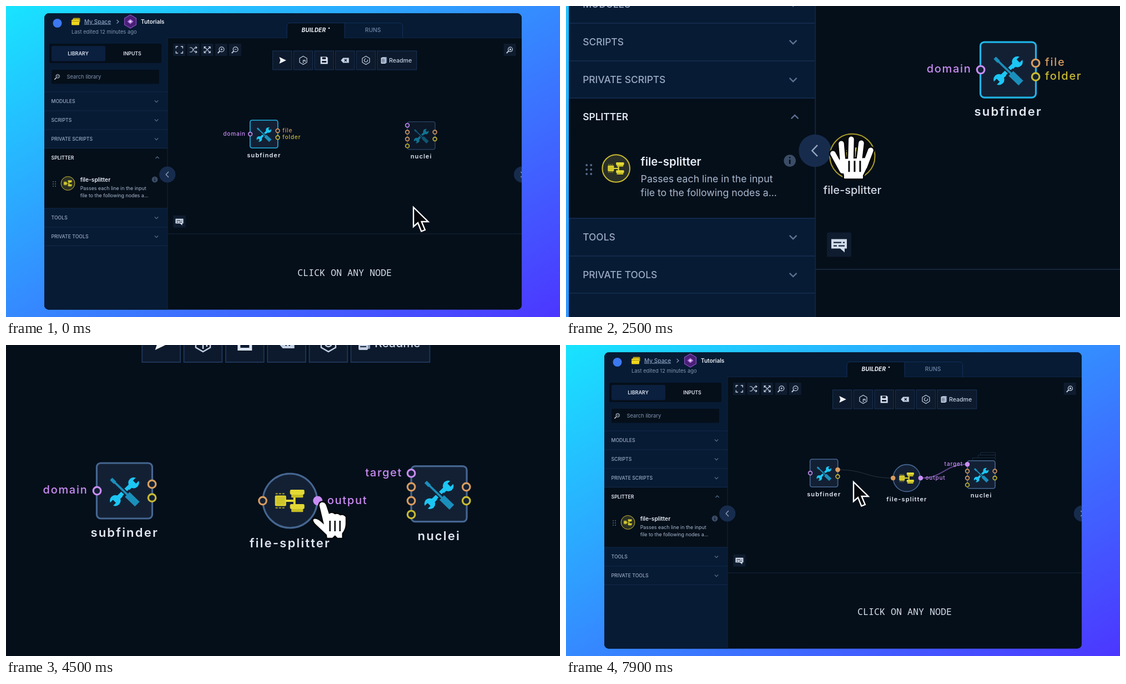
These frames come from a looping animation (998 by 561 pixels, 8 s). An HTML page:

```html
<!DOCTYPE html>
<html lang="en">
<head>
<meta charset="utf-8">
<title>Workflow builder</title>
<style>
html, body { margin: 0; width: 100%; height: 100%; overflow: hidden; background: #050f1a; }
svg { display: block; width: 100%; height: 100%; }
text { font-family: Inter, "Open Sans", sans-serif; white-space: pre; }
.mono { font-family: "Noto Sans Mono", "Liberation Mono", monospace; }
.node { font-weight: 600; letter-spacing: 1.1px; }
.port { font-weight: 500; letter-spacing: .85px; }
</style>
</head>
<body>
<svg id="stage" viewBox="0 0 998 561" xmlns="http://www.w3.org/2000/svg"></svg>
<script>
const LOOP = 8000, STEP = 100;
const C = {
  panel: '#050f1a', side: '#071b34', rule: '#12294a', text: '#d5deeb', muted: '#8496b3',
  cyan: '#1fb4e6', idle: '#456690', purple: '#c98df5', orange: '#d89c5f', yellow: '#c9bb30',
  bright: '#e3d935', body: '#132034', steel: '#1b8fbb', wrench: '#1cc6f4', icon: '#c4d0e2', ink: '#05070a'
};
// Moments of the story, in ms
const GRAB = 2200, DROP = 3250, PULL1 = 4400, JOIN1 = 5250, PULL2 = 6150, JOIN2 = 7150;

// ---------- drawing helpers ----------
const rect = (x, y, w, h, fill, r = 0, more = '') =>
  `<rect x="${x}" y="${y}" width="${w}" height="${h}" rx="${r}" fill="${fill}" ${more}/>`;
const circle = (x, y, r, fill, more = '') => `<circle cx="${x}" cy="${y}" r="${r}" fill="${fill}" ${more}/>`;
const line = (d, stroke, w = 1, more = '') =>
  `<path d="${d}" fill="none" stroke="${stroke}" stroke-width="${w}" ${more}/>`;
const shape = (d, fill, more = '') => `<path d="${d}" fill="${fill}" ${more}/>`;
const text = (x, y, s, size, fill, more = '') =>
  `<text x="${x}" y="${y}" font-size="${size}" fill="${fill}" ${more}>${s}</text>`;
const at = (x, y, inner, more = '') => `<g transform="translate(${x} ${y})" ${more}>${inner}</g>`;
// Shown only within the given "from-to" spans
const during = (spans, inner) => `<g data-on="${spans}">${inner}</g>`;
const MID = 'text-anchor="middle"', END = 'text-anchor="end"';
const BOLD = 'font-weight="600"', MEDIUM = 'font-weight="500"';
const ROUND = 'stroke-linecap="round" stroke-linejoin="round"';
const HEX = r => `M0 ${-r}L${r * .87} ${-r / 2}V${r / 2}L0 ${r}L${-r * .87} ${r / 2}V${-r / 2}Z`;

// ---------- icons ----------
// One end of the wrench; side is 1 for upper right, -1 for lower left
const jaw = side => circle(8.3 * side, -8 * side, 4.9, C.wrench) +
  line(`M${9 * side} ${-8.7 * side}L${14 * side} ${-13.7 * side}`, C.body, 3.8);
const wrenchIcon = () =>
  line('M7 -6.8L-7 6.8', C.wrench, 4) + jaw(1) + jaw(-1) +
  line('M-9 -8.5L11 10.5', C.body, 4) + line('M1 1L12.5 12', C.body, 8.5) +
  line('M-12 -11.5L3 3', C.steel, 1.9) + line('M-12 -11.5L-8.5 -8', C.steel, 3) +
  line('M2.5 2.5L11.5 11.2', C.steel, 6);

const splitIcon = k => `<g transform="scale(${k})">` +
  line('M-4 0H4M4 -6V6', C.bright, 2) +
  rect(-13, -4.2, 9, 8.4, '#cfc62c', .5, `stroke="${C.bright}" stroke-width="1"`) +
  [-10, 3].map(y => rect(0, y, 13, 4.5, C.bright, 1.2) + rect(1.2, y + 4.5, 10.6, 2.6, '#c7be25', .5)).join('') +
  line('M-13 -6.4H-4M-13 6.4H-4', '#a8a12b', 1, 'stroke-dasharray="2 1"') + '</g>';

const lens = (mark, r = 3.6) => circle(.8, -.8, r, 'none', `stroke="${C.icon}" stroke-width="1.2"`) +
  line('M-2 2L-6 6', C.icon, 1.8) + line(mark, C.icon, 1);
const chevron = (x, y, up) => line(`M${x - 3.2} ${y + (up ? 1.6 : -1.6)}L${x} ${y + (up ? -1.6 : 1.6)}L${x + 3.2} ${y + (up ? 1.6 : -1.6)}`, '#5d7292', 1.2);
const chatIcon = () => shape('M-7 -5H7V3.5H5V7L1 3.5H-7Z', '#d3ddeb') +
  line('M-5 -2H2M3.5 -2H5M-5 1H-2M-.5 1H5', '#17253b', 1.2);

const toolIcons = [
  shape('M-5.5 -6L7 0L-5.5 6L-3.5 0Z', '#f2f6fb'),
  line(HEX(7.5), C.icon, 1.2) + line('M0 5V0H3.4V3', C.icon, 1.3),
  shape('M-6.5 -6.5H4.5L6.5 -4.5V6.5H-6.5Z', '#dbe4f0') + rect(-3.5, -5.5, 6.5, 3.6, '#0b1a31') + rect(-4, 1, 8, 3, '#0b1a31'),
  shape('M-7.5 0L-3.5 -4.5H7V4.5H-3.5Z', C.icon) + line('M-1 -2L3 2M3 -2L-1 2', '#0b1a31', 1.3),
  line(HEX(7.5), C.icon, 1.2) + circle(0, 0, 3, 'none', `stroke="${C.icon}" stroke-width="1.2" stroke-dasharray="14 3"`)
];

// ---------- application frame ----------
function header() {
  return rect(69, 13, 860, 45, C.side) + line('M69 57.5H929', '#0f2442') +
    circle(92.5, 31, 8, '#3c78f0') +
    at(126, 28, rect(-5.5, -6.5, 13, 8, '#b59e13', 1.5) + rect(-8, -3.5, 14, 10, '#efd51f', 1.5) + line('M-8 -.5H6', '#a18c10', 1)) +
    text(141, 31.5, 'My Space', 10.1, '#8ea3c2', `${MEDIUM} text-decoration="underline"`) +
    line('M199.5 25L203 28.2L199.5 31.5', C.muted, 1.2) +
    at(224, 28, shape(HEX(12), '#4a1f77', 'stroke="#8a4fc4" stroke-width="1.2"') +
      shape('M-5.5 0L0 -4.5L5.5 0L0 4.5Z', '#b47be0') + circle(0, 0, 1.8, '#f0e2ff')) +
    text(243, 31.5, 'Tutorials', 10.1, '#edf2f9', BOLD) +
    text(118, 50, 'Last edited 12 minutes ago', 9.35, C.muted) +
    shape('M506 59V37Q506 30.5 512.5 30.5H610V59Z', C.panel) +
    line('M506 58V37Q506 30.5 512.5 30.5H708Q714.5 30.5 714.5 37V58M610 30.5V58', '#12305a') +
    text(532.5, 46.7, 'BUILDER', 10, '#f1f5fb', 'font-weight="700" font-style="italic" letter-spacing=".2"') +
    circle(582, 40, 1.2, '#f1f5fb') +
    text(661, 46.7, 'RUNS', 10.2, '#7086a8', `${MID} ${MEDIUM}`);
}

function sidebar() {
  const row = (y, name) => text(81.5, y + 3.2, name, 8.7, '#9aabc4', MEDIUM) + chevron(271, y);
  const rules = [155, 189, 223, 256.5, 365, 399, 432.5].map(y => `M69 ${y}H291`).join('');
  const dots = [0, 1, 2].map(i => [85, 89].map(x => circle(x, 317 + i * 4, 1, '#566a88')).join('')).join('');
  return rect(69, 57, 222, 491, C.side) +
    rect(78, 68, 202, 35, C.panel, 3) + rect(82, 72, 97, 27.5, '#0b1f3f', 3) +
    text(130, 88.7, 'LIBRARY', 8.9, '#dbe4f0', `${MID} ${BOLD}`) + text(227.5, 88.7, 'INPUTS', 8.7, '#dbe4f0', `${MID} ${BOLD}`) +
    rect(82, 115, 194, 25.5, C.panel, 2) +
    at(92.5, 127.5, `<g transform="scale(.85)">${lens('M-1 -.8H2.6')}</g>`) +
    text(109.5, 131, 'Search library', 9.4, C.muted) +
    rect(69, 257, 222, 108, C.panel) + line(rules, C.rule) +
    row(172, 'MODULES') + row(206, 'SCRIPTS') + row(240, 'PRIVATE SCRIPTS') +
    row(382, 'TOOLS') + row(416, 'PRIVATE TOOLS') +
    text(81.5, 276.7, 'SPLITTER', 8.7, '#dfe7f2', BOLD) + chevron(272.5, 273.5, true) +
    during(`1450-${GRAB}`, rect(78.2, 301, 201.5, 54, '#1d3560', 2)) +
    dots + circle(111.5, 320, 12.4, '#2a3027', `stroke="${C.yellow}" stroke-width="1"`) +
    at(111.5, 320, splitIcon(.55)) +
    text(133.7, 317.3, 'file-splitter', 10.2, '#e6edf6', BOLD) +
    text(133.7, 332.3, 'Passes each line in the input', 8.85, '#a9b9d0') +
    text(133.7, 344.8, 'file to the following nodes a...', 8.85, '#a9b9d0') +
    circle(268, 313, 5.4, '#3b4c66') + line('M268 312V316M268 309.6V310.8', C.panel, 1.3) +
    line('M291 58V548', '#13243c');
}

function canvasTools() {
  const views = [
    line('M-6 -2.5V-6H-2.5M2.5 -6H6V-2.5M6 2.5V6H2.5M-2.5 6H-6V2.5', C.icon, 1.4),
    line('M-6.5 -4H-3L3 4H6M-6.5 4H-3L3 -4H6M4 -6L6.5 -4L4 -2M4 2L6.5 4L4 6', C.icon, 1.2),
    line('M-5 -5L5 5M5 -5L-5 5M-5.5 -2V-5.5H-2M2 -5.5H5.5V-2M5.5 2V5.5H2M-2 5.5H-5.5V2', C.icon, 1.2),
    lens('M-1.2 -.8H2.8M.8 -2.8V1.2', 4.4), lens('M-1.2 -.8H2.8', 4.4)
  ];
  const tile = (x, y, icon) => at(x, y, rect(-11, -11, 22, 22, '#0f1c2f', 1) + icon);
  const box = 'stroke="#1c3558" stroke-width="1"', boxFill = '#0d1a2d';
  return views.map((icon, i) => tile(312.3 + i * 25.1, 79, icon)).join('') +
    tile(907.7, 79, lens('M-.8 -.8H2.4', 4) + circle(.8, -.8, 1.6, C.icon)) +
    tile(312.4, 388.8, chatIcon()) +
    toolIcons.map((icon, i) => at(497.8 + i * 37.65, 98, rect(-17.2, -17, 34.4, 34, boxFill, 0, box) + icon)).join('') +
    rect(668.7, 81, 71, 34, boxFill, 0, box) +
    at(680.5, 98, rect(-3, -6, 8.5, 11, C.muted, 1) + rect(-5, -5, 8.5, 11, C.icon, 1) + line('M-3.5 -2H2M-3.5 .5H2M-3.5 3H2', '#17253b', .9)) +
    text(690, 101.6, 'Readme', 10.6, C.icon, MEDIUM) +
    line('M291 411H929', '#17263b') +
    text(610, 487, 'CLICK ON ANY NODE', 16.7, '#d9e2ee', `class="mono" ${MID}`);
}

const drawer = (x, dir) => circle(x, 304, 14.6, '#172c4d') +
  line(`M${x + 2.2 * dir} 299L${x - 2.6 * dir} 304L${x + 2.2 * dir} 309`, '#98a9c2', 1.2);

// ---------- graph ----------
const port = (x, y, color, filledFrom) =>
  circle(x, y, 3.4, C.body, `stroke="${color}" stroke-width="1.6"`) +
  (filledFrom ? during(`${filledFrom}-${LOOP}`, circle(x, y, 4, color)) : '');
const portName = (x, y, name, color, more = '') => text(x, y, name, 10, color, `class="port" ${more}`);
const nodeName = (x, y, name) => text(x + .6, y, name, 11, '#e0e8f3', `class="node" ${MID}`);
const square = (x, y, stroke) => rect(x - 25, y - 25, 50, 50, C.body, 3.5, `stroke="${stroke}" stroke-width="1.6"`);

function graph() {
  const stack = [[9.5, 30.5], [19.5, 35.5], [24, 40]]
    .map(([dx, dy]) => `M${723 + dx} ${238 - dy}V${234 - dy}H773.5V${238 - dy}`).join('');
  const subfinder =
    during(`0-${DROP}`, square(464.7, 231, C.cyan)) + during(`${DROP}-${LOOP}`, square(464.7, 231, C.idle)) +
    at(464.7, 231.8, wrenchIcon()) +
    port(440, 231, C.purple) + port(489.5, 225, C.orange, JOIN2 - 50) + port(489.5, 237.3, C.yellow) +
    nodeName(464.2, 272.6, 'subfinder') +
    during(`0-${DROP} ${PULL1}-${JOIN1}`, portName(431.7, 233.6, 'domain', C.purple, END)) +
    during(`0-${DROP} ${PULL2}-${JOIN2}`, portName(498, 227.6, 'file', C.orange)) +
    during(`0-${DROP}`, portName(498, 239.8, 'folder', C.yellow));
  const nuclei =
    during(`${JOIN1 - 50}-${LOOP}`, line(stack, '#1b2a3f', 1)) +
    `<g id="nuclei">${square(748, 233.8, C.idle)}${at(748, 234.6, wrenchIcon())}</g>` +
    port(723, 215.2, C.purple, JOIN1 - 50) + port(723, 227.5, C.orange) + port(723, 240, C.orange) + port(723, 252.4, C.yellow) +
    port(772.6, 227.5, C.orange) + port(772.6, 240, C.yellow) +
    nodeName(747.5, 275.3, 'nuclei') +
    during(`${PULL1}-${JOIN1} 6050-${LOOP}`, portName(715, 217.8, 'target', C.purple, END)) +
    during(`${PULL2}-${JOIN2}`, portName(781, 230, 'file', C.orange));
  const disc = stroke => circle(613.8, 240, 24.4, C.body, `stroke="${stroke}" stroke-width="1.6"`);
  const splitter = during(`${DROP}-${LOOP}`,
    disc(C.idle) + during(`${DROP}-${PULL1} ${JOIN1}-${PULL2}`, disc(C.bright)) +
    at(613.8, 240, splitIcon(1)) +
    port(589.2, 240, C.orange, PULL2) + port(638.8, 240, C.purple, PULL1) +
    nodeName(613.3, 282, 'file-splitter') +
    during(`${DROP}-${PULL1} ${JOIN1}-${JOIN2}`, portName(581.2, 243, 'multiple', C.orange, END)) +
    portName(647.4, 242.8, 'output', C.purple));
  return line('', '', 1, 'id="edge1"') + line('', '', 1, 'id="edge2"') + subfinder + nuclei + splitter;
}

// ---------- pointers ----------
const arrow = shape('M1 2V37L9 30L15.2 45.5L21.8 42.8L15.6 28H27.5Z', C.ink,
  'stroke="#fff" stroke-width="2.4" stroke-linejoin="miter"');
const hand = shape('M-2.7 3Q-2 -.5 1.2 -.2Q4 0 5 4L7 10Q9.5 8.5 12 10.5Q14.5 9.5 16.8 11.5Q20 10.5 22.2 13.5V20Q22 25 19 28.5V33H14L12 31L10 33H4.5L4 30L-6 20.5Q-9.5 16.5 -7.5 15Q-4.5 13.5 1 18.5Z',
  '#fff', `stroke="${C.ink}" stroke-width="1.3"`) + line('M7.5 17V26.5M12 17V26.5M16.5 17V26.5', C.ink, 1.3);
const fingers = 'M-8.5 6L-10 -11.5M-1.5 4L-1 -15.5M6 5L8 -12M11 9L16.5 -5.5M-9 13L-17.5 -2.5';
const palm = 'M-11 3L11 2L12.5 10L9 17V19.5H-7V17Z';
const openHand = [[C.ink, 2.6], ['#fff', 0]].map(([color, grow]) =>
  line(fingers, color, 4.8 + grow, ROUND) + shape(palm, color, `stroke="${color}" stroke-width="${1 + grow}" stroke-linejoin="round"`)).join('') +
  line('M-3 4V14M2 4V14M7 4V14', C.ink, 1.5);
const ghost = circle(0, 0, 20.3, '#0a0d0f', 'stroke="#a89d2a" stroke-width="1"') + splitIcon(.8) +
  text(0, 34, 'file-splitter', 10, '#d0d9e6', `${MID} ${MEDIUM}`);

const pointer = during(`0-${GRAB} ${DROP}-4250 ${JOIN1}-6000 ${JOIN2}-${LOOP}`, arrow) +
  during(`4250-${JOIN1} 6000-${JOIN2}`, hand) +
  during(`${GRAB}-${DROP}`, ghost + openHand);

const stage = document.getElementById('stage');
stage.innerHTML = `<defs>
  <linearGradient id="sky" x1="0" y1="0" x2="1" y2="1">
    <stop offset="0" stop-color="#18e4ff"/><stop offset=".48" stop-color="#348dff"/><stop offset="1" stop-color="#4c36ff"/>
  </linearGradient>
  <clipPath id="window">${rect(69, 13.3, 860, 534.4, '#000', 8)}</clipPath>
  <filter id="blur" filterUnits="userSpaceOnUse" color-interpolation-filters="sRGB" x="-20" y="-20" width="1038" height="601"><feGaussianBlur id="smear"/></filter>
</defs>
<g id="lens"><g id="world">
  ${rect(0, 0, 998, 561, 'url(#sky)')}
  <g clip-path="url(#window)">${rect(69, 13, 860, 535, C.panel)}${header()}${sidebar()}${canvasTools()}${drawer(290.7, 1)}${drawer(929.5, -1)}${graph()}</g>
  <g id="pointer">${pointer}</g>
</g></g>`;
const $ = id => document.getElementById(id);
const timed = [...stage.querySelectorAll('[data-on]')].map(el => ({
  el, spans: el.dataset.on.split(' ').map(s => s.split('-').map(Number))
}));

// ---------- motion ----------
// Camera moves: start time, then scale, x and y it settles on (critically damped spring)
const RATE = 7;
const shots = [[0, 1, 0, 0], [1010, 2, -132.8, -347], [2638, 2, -716, -199], [4600, 1, 0, 0]];

function camera(t) {
  const view = shots[0].slice(1), speed = [0, 0, 0];
  for (let i = 1; i < shots.length; i++) {
    const x = RATE * (t - shots[i][0]) / 1000;
    if (x <= 0) continue;
    const done = 1 - (1 + x) * Math.exp(-x), rate = RATE * x * Math.exp(-x);
    for (let k = 0; k < 3; k++) {
      const delta = shots[i][k + 1] - shots[i - 1][k + 1];
      view[k] += delta * done;
      speed[k] += delta * rate;
    }
  }
  return { view, speed };
}

const stops = [
  [450, 733, 361], [1550, 228, 332], [2250, 228, 332], [2880, 613.6, 240.5], [3400, 613.6, 240.5],
  [4250, 642.3, 241], [4600, 642.3, 241], [5100, 726, 216], [5260, 726, 216], [5360, 708, 214],
  [5430, 708, 214], [6050, 593, 241], [6300, 593, 241], [6950, 493, 226], [7200, 493, 226], [7650, 517, 245]
];
const ease = p => p < .5 ? 4 * p ** 3 : 1 - (2 - 2 * p) ** 3 / 2;

function pointerAt(t) {
  const next = stops.findIndex(s => s[0] > t);
  if (next === 0) return stops[0].slice(1);
  if (next < 0) return stops[stops.length - 1].slice(1);
  const [a, b] = [stops[next - 1], stops[next]], p = ease((t - a[0]) / (b[0] - a[0]));
  return [a[1] + (b[1] - a[1]) * p, a[2] + (b[2] - a[2]) * p];
}

function link(id, from, to, color, width) {
  const mid = (from[0] + to[0]) / 2, el = $(id);
  el.setAttribute('d', `M${from}C${mid} ${from[1]} ${mid} ${to[1]} ${to}`);
  el.setAttribute('stroke', color);
  el.setAttribute('stroke-width', width);
}

function draw(t) {
  const { view: [scale, x, y], speed } = camera(t);
  $('world').setAttribute('transform', `translate(${x} ${y}) scale(${scale})`);
  const smear = speed.slice(1).map((v, i) => Math.abs(v + speed[0] * (i ? 280 : 499)) * .0012);
  if (Math.max(...smear) > .25) {
    $('smear').setAttribute('stdDeviation', smear.join(' '));
    $('lens').setAttribute('filter', 'url(#blur)');
  } else $('lens').removeAttribute('filter');

  const [px, py] = pointerAt(t), tip = [px - 3.5, py - .6];
  $('pointer').setAttribute('transform', `translate(${px} ${py})`);
  for (const { el, spans } of timed)
    el.style.display = spans.some(([a, b]) => t >= a && t < b) ? '' : 'none';
  $('nuclei').setAttribute('opacity', t < DROP ? .55 : 1);

  const hot = t >= JOIN2, held = t >= PULL2;
  $('edge1').style.display = t >= 4600 ? '' : 'none';
  link('edge1', [638.8, 240], t < JOIN1 ? tip : [723, 215.2], hot ? '#5f4589' : held ? '#2a2f45' : '#1b2a3f', hot ? 2 : held ? 1.6 : 1);
  $('edge2').style.display = t >= 6300 ? '' : 'none';
  link('edge2', t < JOIN2 ? tip : [489.5, 225], [589.2, 240], '#2a333f', 1);
}

function tick(now) {
  draw(Math.floor(now % LOOP / STEP) * STEP);
  requestAnimationFrame(tick);
}
draw(0);
requestAnimationFrame(tick);
</script>
</body>
</html>
```
